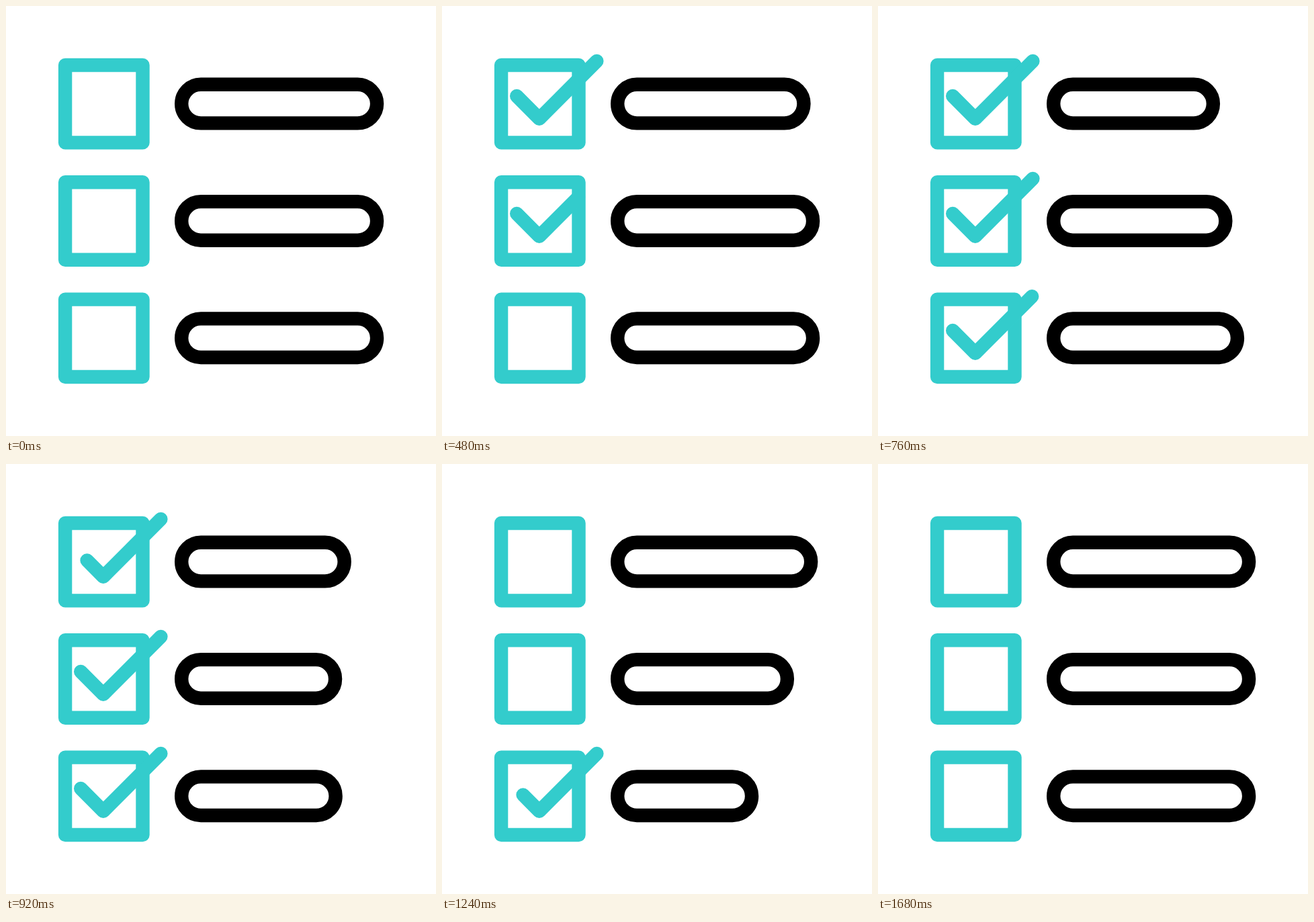
These frames come from a looping animation (640x640 px, 2 s). An HTML page:

```html
<!DOCTYPE html>
<html lang="en">
<head>
<meta charset="utf-8">
<title>Checklist</title>
<style>
  html, body { margin: 0; width: 100%; height: 100%; overflow: hidden; background: #fff; }
  svg { display: block; width: 100%; height: 100%; }
  svg * { fill: none; stroke-width: 20.4; stroke-linecap: round; stroke-linejoin: round; }
  .box, .tick { stroke: #33cccc; }
  .bar { stroke: #000; }
</style>
</head>
<body>
<svg id="stage" viewBox="0 0 640 640"></svg>
<script>
const LOOP = 2000, STEP = 40;
const BAR_WIDTH = 290.9;

// y: row offset, tickY: tick offset, shrink: how far the bar shortens,
// from / mid / to: times at which the bar starts, turns and rests
const rows = [
  { y: 0,     tickY: 0,   shrink: 55,   from: 320, mid: 813,  to: 1309 },
  { y: 174.3, tickY: 175, shrink: 69.5, from: 490, mid: 1030, to: 1480 },
  { y: 348.6, tickY: 349, shrink: 101,  from: 625, mid: 1140, to: 1655 }
];

const stage = document.getElementById('stage');

function add(tag, attrs) {
  const el = document.createElementNS('http://www.w3.org/2000/svg', tag);
  for (const key in attrs) el.setAttribute(key, attrs[key]);
  return stage.appendChild(el);
}

const progress = (t, a, b) => Math.min(1, Math.max(0, (t - a) / (b - a)));
const smooth = u => u * u * (3 - 2 * u);
const easeIn = u => u ** 3;
const easeOut = u => 1 - (1 - u) ** 3;

for (const row of rows) {
  add('rect', { class: 'box', x: 88.1, y: 88 + row.y, width: 115.4, height: 115.4 });
  row.bar = add('rect', { class: 'bar', x: 261.2, y: 116.8 + row.y, height: 57.6, rx: 28.8 });
  row.tick = add('path', {
    class: 'tick', pathLength: 1, d: 'M111.2 134L144.8 167.8L230.4 82',
    transform: `translate(0 ${row.tickY})`
  });
}

function draw(t) {
  rows.forEach((row, i) => {
    const local = t - i * 160;
    const head = easeOut(progress(local, 203, 505));
    const tail = easeIn(progress(local, 800, 1080));
    const visible = head - tail > 0.0001;
    row.tick.style.visibility = visible ? 'visible' : 'hidden';
    row.tick.setAttribute('stroke-dasharray', `${Math.max(0, head - tail)} 2`);
    row.tick.setAttribute('stroke-dashoffset', -tail);

    const short = smooth(progress(t, row.from, row.mid)) - smooth(progress(t, row.mid, row.to));
    row.bar.setAttribute('width', BAR_WIDTH - row.shrink * short);
  });
}

function tick() {
  const t = performance.now() % LOOP;
  draw(Math.floor(t / STEP) * STEP);
  requestAnimationFrame(tick);
}
tick();
</script>
</body>
</html>
```
